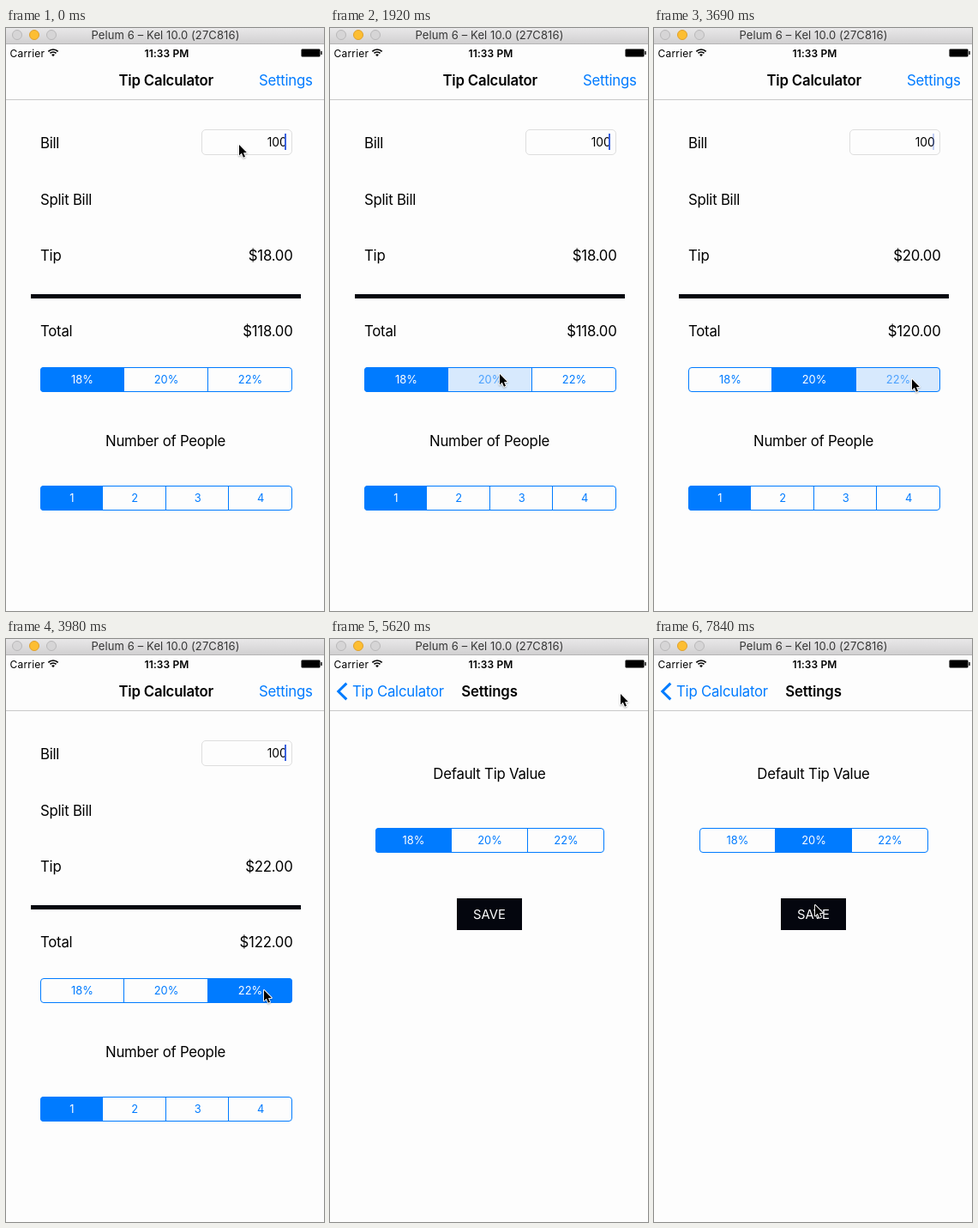
An HTML page with a canvas for the animation above (7.99 s loop, 371 px wide and 679 px high).

```html
<!DOCTYPE html>
<html lang="en">
<head>
<meta charset="utf-8">
<title>Tip Calculator</title>
<style>
html, body { margin: 0; width: 100%; height: 100%; overflow: hidden; background: #fdfdfd; }
canvas { display: block; width: 371px; height: 679px; }
</style>
</head>
<body>
<canvas id="stage"></canvas>
<script>
const W = 371, H = 679, LOOP = 7990;
const BLUE = '#007bff', PAPER = '#fdfdfd', INK = '#04060e';
const RATES = ['18%', '20%', '22%'];

// The screen refreshes in ticks; every time below counts ticks.
const TICK = 147.8, LEAD = 12;
const LINK_PRESS = 34, PUSH_START = 36, PUSH_LENGTH = 2;
const HOME = [272, 136];
const GLIDES = [
  { from: 4, to: 10.3, x: 198, y: 403 },
  { from: 16, to: 17, x: 301, y: 409 },
  { from: 28, to: 30, x: 355, y: 72 },
  { from: 31, to: 33, x: 339, y: 64 },
  { from: 39, to: 41, x: 258, y: 229 },
  { from: 42, to: 46, x: 198, y: 234 },
  { from: 52, to: 53, x: 188, y: 310 }
];
const TIP_CLICKS = [{ down: 13, up: 14, index: 1 }, { down: 25, up: 27, index: 2 }];
const DEFAULT_CLICKS = [{ down: 51, up: 52, index: 1 }];

const canvas = document.getElementById('stage');
const ctx = canvas.getContext('2d');
const dpr = window.devicePixelRatio || 1;
canvas.width = W * dpr;
canvas.height = H * dpr;

const clamp = u => Math.min(1, Math.max(0, u));
const smooth = u => u * u * (3 - 2 * u);

function pointerAt(k) {
  let [x, y] = HOME;
  for (const g of GLIDES) {
    const u = smooth(clamp((k - g.from) / (g.to - g.from)));
    x += (g.x - x) * u;
    y += (g.y - y) * u;
  }
  return [x, y];
}

function choiceAt(k, clicks) {
  let selected = 0, pressed = -1;
  for (const { down, up, index } of clicks) {
    if (k >= up) selected = index;
    else if (k >= down) pressed = index;
  }
  return [selected, pressed];
}

// Blinks once a second, passing a faint stage on the way out and in.
function caretAt(k) {
  const fromDark = Math.abs(k * TICK % 1000 - 510);
  return fromDark < 165 ? 0 : fromDark < 310 ? .3 : 1;
}

const pushAt = k => 1 - (1 - clamp((k - PUSH_START) / PUSH_LENGTH)) ** 4;

function text(str, x, y, { size = 16.8, weight = 400, color = '#000', align = 'left', gap = 0, alpha = 1 } = {}) {
  ctx.save();
  ctx.globalAlpha *= alpha;
  ctx.font = `${weight} ${size}px Inter, "Liberation Sans", sans-serif`;
  ctx.letterSpacing = gap + 'px';
  ctx.textAlign = align;
  ctx.fillStyle = color;
  ctx.fillText(str, x, y);
  ctx.restore();
}

const body = (str, x, y, opts) => text(str, x, y, { gap: -.25, ...opts });
const heading = (str, x, alpha) =>
  text(str, x, 67, { weight: 600, align: 'center', gap: -.2, alpha });

function rect(x, y, w, h, color) {
  ctx.fillStyle = color;
  ctx.fillRect(x, y, w, h);
}

function path(points) {
  ctx.beginPath();
  points.forEach(([x, y]) => ctx.lineTo(x, y));
}

function outline(x, y, w, h, r, color) {
  ctx.strokeStyle = color;
  ctx.lineWidth = 1;
  ctx.beginPath();
  ctx.roundRect(x + .5, y + .5, w - 1, h - 1, r - .5);
  ctx.stroke();
}

function segments(x, y, w, labels, selected, pressed) {
  const h = 29, cell = w / labels.length;
  ctx.save();
  ctx.beginPath();
  ctx.roundRect(x, y, w, h, 4);
  ctx.clip();
  labels.forEach((label, i) => {
    const left = Math.floor(x + i * cell), right = Math.floor(x + (i + 1) * cell);
    if (i === selected) rect(left, y, right - left, h, BLUE);
    if (i === pressed) rect(left, y, right - left, h, 'rgba(0,122,255,.15)');
    if (i) rect(left - 1, y, 1, h, BLUE);
    text(label, x + (i + .5) * cell, y + 19, {
      size: 12.9, align: 'center',
      color: i === selected ? '#fff' : BLUE,
      alpha: i === pressed ? .65 : 1
    });
  });
  ctx.restore();
  outline(x, y, w, h, 4, BLUE);
}

function windowBar() {
  const shade = ctx.createLinearGradient(0, 0, 0, 18);
  shade.addColorStop(0, '#e9e8e9');
  shade.addColorStop(1, '#d1d0d1');
  rect(0, 0, W, 18, shade);
  rect(0, 18, W, 1, '#b5b4b5');
  ctx.lineWidth = 1;
  for (let i = 0; i < 3; i++) {
    ctx.beginPath();
    ctx.arc(13 + 20 * i, 8, 5.5, 0, 7);
    ctx.fillStyle = i === 1 ? '#fdbe32' : '#d6d5d6';
    ctx.strokeStyle = i === 1 ? '#dfa02c' : '#b9b8b9';
    ctx.fill();
    ctx.stroke();
  }
  text('Pelum 6 – Kel 10.0 (27C816)', 186, 13, { size: 13, align: 'center', color: '#363636', gap: .1 });
}

function statusBar() {
  text('Carrier', 4.5, 33.5, { size: 12, gap: .2 });
  text('11:33 PM', 187.5, 33.5, { size: 12, weight: 600, align: 'center', gap: .1 });
  const a = -Math.PI * .75, b = -Math.PI * .25;
  ctx.strokeStyle = ctx.fillStyle = '#000';
  ctx.lineWidth = 1.7;
  for (const r of [5, 8]) {
    ctx.beginPath();
    ctx.arc(55, 33, r, a, b);
    ctx.stroke();
  }
  ctx.beginPath();
  ctx.moveTo(55, 33.2);
  ctx.arc(55, 33, 2.7, a, b);
  ctx.fill();
  outline(344, 24, 23, 10, 2, '#777');
  rect(345, 25, 21, 8, '#000');
  rect(367.3, 27, 1.4, 4, '#000');
}

function navBar(k, push) {
  if (push < 1) {
    heading('Tip Calculator', 186.7 - 107 * push, 1 - push);
    const alpha = (k < LINK_PRESS ? 1 : .2) * (1 - push);
    body('Settings', 357.6, 67, { color: BLUE, align: 'right', alpha });
  }
  if (push > 0) {
    const rest = 1 - push;
    heading('Settings', 186 + 170 * rest, push);
    body('Tip Calculator', 26 + 106 * rest, 67, { color: BLUE, alpha: push });
    ctx.save();
    ctx.globalAlpha = push;
    ctx.strokeStyle = BLUE;
    ctx.lineWidth = 3;
    path([[19.3, 51.6], [9.8, 61], [19.3, 70.4]]);
    ctx.stroke();
    ctx.restore();
  }
  rect(0, 83, W, 1, '#c9c9c9');
}

function calculator(k) {
  const [selected, pressed] = choiceAt(k, TIP_CLICKS);
  const tip = parseInt(RATES[selected], 10);
  const money = (n, y) => body('$' + n.toFixed(2), 334.5, y, { align: 'right' });

  body('Bill', 40, 139.5);
  body('Split Bill', 40, 205.5);
  body('Tip', 40, 270.5);
  body('Total', 40, 358.5);
  money(tip, 270.5);
  money(100 + tip, 358.5);
  rect(29, 310, 315, 5, INK);

  outline(228, 118, 106, 30, 5, '#dedede');
  text('100', 327.7, 138, { size: 13.8, align: 'right' });
  rect(325, 123, 2, 19, `rgba(58,98,222,${caretAt(k)})`);

  segments(40, 395, 294, RATES, selected, pressed);
  body('Number of People', 186, 486.5, { align: 'center' });
  segments(40, 533, 294, ['1', '2', '3', '4'], 0, -1);
}

function settings(k) {
  body('Default Tip Value', 186, 162.5, { align: 'center' });
  segments(53, 220, 267, RATES, ...choiceAt(k, DEFAULT_CLICKS));
  rect(148, 302, 76, 37, INK);
  text('SAVE', 186, 326, { size: 14.8, align: 'center', color: '#fff' });
}

function pages(k, push) {
  ctx.save();
  ctx.beginPath();
  ctx.rect(0, 84, W, H - 84);
  ctx.clip();
  if (push < 1) {
    ctx.save();
    ctx.translate(-.3 * W * push, 0);
    calculator(k);
    ctx.restore();
    rect(0, 84, W, H, `rgba(0,0,0,${.1 * push})`);
  }
  if (push > 0) {
    ctx.translate(Math.round(W * (1 - push)), 0);
    rect(0, 84, W, H, PAPER);
    settings(k);
  }
  ctx.restore();
}

function pointer(x, y) {
  ctx.save();
  ctx.translate(x, y);
  ctx.scale(.92, .92);
  path([[0, 0], [0, 13.5], [3.1, 10.7], [5.4, 16], [7.6, 15], [5.4, 10], [9.6, 9.8]]);
  ctx.closePath();
  ctx.lineJoin = 'round';
  ctx.lineWidth = 2;
  ctx.strokeStyle = '#fff';
  ctx.shadowColor = 'rgba(0,0,0,.3)';
  ctx.shadowBlur = 2 * dpr;
  ctx.shadowOffsetY = dpr;
  ctx.stroke();
  ctx.shadowColor = 'transparent';
  ctx.fillStyle = '#000';
  ctx.fill();
  ctx.restore();
}

function draw(t) {
  const k = Math.floor((t + LEAD) / TICK);
  const push = pushAt(k);
  ctx.setTransform(dpr, 0, 0, dpr, 0, 0);
  rect(0, 0, W, H, PAPER);
  pages(k, push);
  windowBar();
  statusBar();
  navBar(k, push);
  pointer(...pointerAt(k));
}

const start = performance.now();
function tick() {
  draw((performance.now() - start) % LOOP);
  requestAnimationFrame(tick);
}
tick();
</script>
</body>
</html>
```
